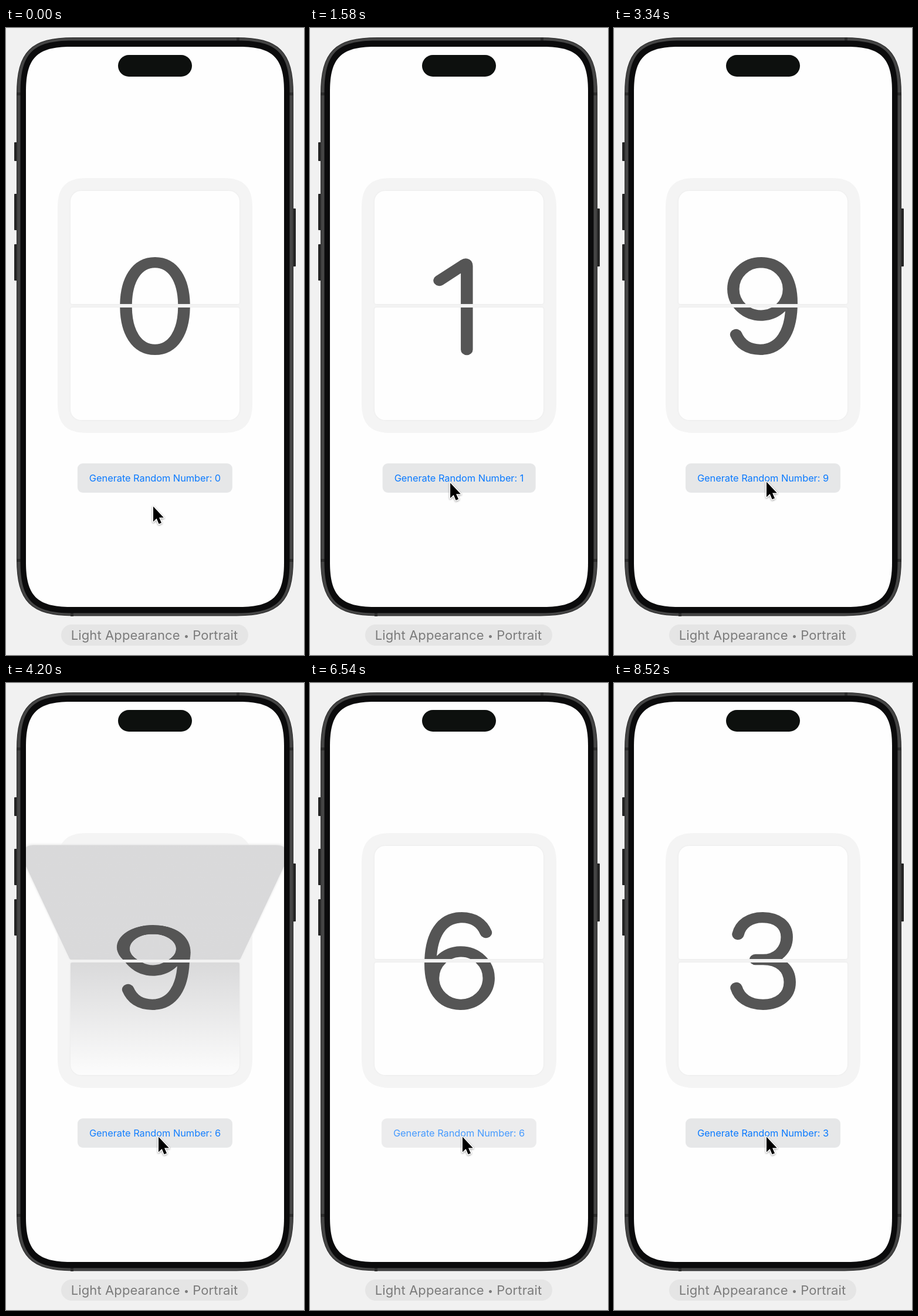
Write an HTML page that moves like this. It is 508 by 1070 pixels and loops after 8830 ms.

```html
<!DOCTYPE html>
<html lang="en">
<head>
<meta charset="utf-8">
<title>Flip counter</title>
<style>
  html, body { margin: 0; width: 100%; height: 100%; overflow: hidden; background: #f1f1f1; }
  #stage { position: relative; width: 508px; height: 1070px; overflow: hidden; font-family: Inter, sans-serif; }
  #phone, #screen { position: absolute; left: 0; top: 0; width: 508px; height: 1070px; }
  .half {
    position: absolute; left: 110px; width: 288px; overflow: hidden;
    background-color: #fefefe; box-shadow: 0 0 2px 1px #ededed;
  }
  .half svg { display: block; }
  .half path { fill: none; stroke: #555; stroke-width: 18.3; stroke-linecap: round; stroke-linejoin: round; }
  .top { top: 278px; height: 193px; border-radius: 18px 18px 3px 3px; transform-origin: 144px 196px; }
  .bottom { top: 477px; height: 192px; border-radius: 3px 3px 18px 18px; transform-origin: 144px -3px; }
  #button {
    position: absolute; left: 254px; top: 743px; height: 50px; padding: 0 20px;
    transform: translateX(-50%); border-radius: 9px; background: #e6e7e8; color: #0a7aff;
    font-size: 16.4px; letter-spacing: -.06px; line-height: 50px; white-space: nowrap;
  }
  #cursor {
    position: absolute; left: 0; top: 0; width: 30px; height: 40px; overflow: visible;
    filter: drop-shadow(0 1px 1.5px rgba(0, 0, 0, .4));
  }
</style>
</head>
<body>
<div id="stage">
  <svg id="phone" viewBox="0 0 508 1070">
    <g fill="#242424">
      <rect x="14" y="195" width="8" height="32" rx="1"/>
      <rect x="14" y="283" width="8" height="62" rx="1"/>
      <rect x="14" y="369" width="8" height="62" rx="1"/>
      <rect x="486" y="308" width="8" height="99" rx="1"/>
    </g>
    <path id="rim" fill="#454545" stroke="#353535" stroke-width="1.5"/>
    <g fill="#2d2d2d">
      <rect x="18" y="110" width="8" height="5"/>
      <rect x="482" y="110" width="8" height="5"/>
      <rect x="18" y="906" width="8" height="5"/>
      <rect x="482" y="906" width="8" height="5"/>
      <rect x="393" y="16" width="5" height="7"/>
      <rect x="110" y="997" width="5" height="7"/>
    </g>
    <path id="bezel" fill="#0b0b0c"/>
    <path id="glass" fill="#fefefe"/>
    <rect x="191" y="46" width="126" height="37" rx="18.5" fill="#0d100e"/>
    <path id="panel" fill="#f4f4f4"/>
    <rect x="94" y="1018" width="319" height="36" rx="18" fill="#e5e5e5"/>
    <text x="253" y="1044" font-size="22" letter-spacing=".1" fill="#7b7b7b" text-anchor="middle">Light Appearance <tspan font-size="16" dy="-1">•</tspan><tspan dy="1"> Portrait</tspan></text>
  </svg>
  <div id="screen">
    <div id="button">Generate Random Number: <span id="value">0</span></div>
  </div>
  <svg id="cursor" viewBox="0 0 30 40">
    <path d="M0 0V26L5.7 20.6L9.6 29.8L14 27.9L10 19H17.8Z"
      fill="#000" stroke="#fff" stroke-width="3" stroke-linejoin="round" paint-order="stroke"/>
  </svg>
</div>
<script>
const LOOP = 8830, FLIP = 600, FADE = 400, DEPTH = 395;
const $ = id => document.getElementById(id);
const clamp = v => Math.max(0, Math.min(1, v));

// Rounded box with smooth corners: a = corner reach, b = control distance.
function box(x, y, w, h, a, b) {
  const r = x + w, e = y + h;
  return `M${x + a} ${y}H${r - a}C${r - b} ${y} ${r} ${y + b} ${r} ${y + a}` +
    `V${e - a}C${r} ${e - b} ${r - b} ${e} ${r - a} ${e}` +
    `H${x + a}C${x + b} ${e} ${x} ${e - b} ${x} ${e - a}` +
    `V${y + a}C${x} ${y + b} ${x + b} ${y} ${x + a} ${y}Z`;
}
const glass = box(34, 32, 440, 956, 76, 19);
$('rim').setAttribute('d', box(18.7, 16.7, 470.6, 986, 96, 24));
$('bezel').setAttribute('d', box(24.5, 21.5, 459, 977, 88, 21.5));
$('glass').setAttribute('d', glass);
$('panel').setAttribute('d', box(88, 256, 332, 435, 50, 15));
$('screen').style.clipPath = `path("${glass}")`;

// Digits are centred on x = 0 and widened, so upright strokes come out heavier.
const nine = 'M-3 400.2A42.3 45.2 0 0 0 -3 490.6A42.3 45.2 0 0 0 -3 400.2' +
  'C28 400.2 43.5 428 43.5 469C43.5 520 26 548.8 -4 548.8C-23 548.8 -35 539 -41 523';
const glyphs = {
  0: 'M0 400.2C28 400.2 44.2 430 44.2 474.5S28 548.8 0 548.8S-44.2 519 -44.2 474.5S-28 400.2 0 400.2Z',
  1: 'M-29.9 431L8 403.5Q11.9 400.5 11.9 406V549',
  3: 'M-38 429C-34 411 -20 400.2 -1 400.2C22 400.2 36.3 413 36.3 433.5C36.3 456 21 472 0 472H-11.5' +
    'H0C26 472 40.8 488 40.8 511C40.8 533 25 548.8 0 548.8C-22 548.8 -36 537 -40.6 520',
  6: nine,
  9: nine
};

function makeHalf(side) {
  const el = document.createElement('div');
  const [y, h] = side === 'top' ? [278, 193] : [477, 192];
  el.className = 'half ' + side;
  el.innerHTML = `<svg width="288" height="${h}" viewBox="110 ${y} 288 ${h}"><path/></svg>`;
  $('screen').append(el);
  return el;
}
const [topCard, bottomCard, topFlap, bottomFlap] = ['top', 'bottom', 'top', 'bottom'].map(makeHalf);

function setDigit(el, n) {
  if (el.digit === n) return;
  el.digit = n;
  const path = el.querySelector('path');
  path.setAttribute('d', glyphs[n]);
  path.setAttribute('transform', `translate(254 0) scale(1.12 1) rotate(${n === 6 ? 180 : 0} 0 474.5)`);
}

const shade = alpha => `rgba(0, 0, 8, ${alpha})`;

function setFlap(el, on, angle, dark) {
  el.style.visibility = on ? 'visible' : 'hidden';
  el.style.transform = `perspective(${DEPTH}px) rotateX(${angle}deg)`;
  el.style.backgroundImage = `linear-gradient(${shade(dark)}, ${shade(dark)})`;
}

// cubic-bezier(.42, 0, .58, 1)
function easeInOut(x) {
  let lo = 0, hi = 1;
  for (let i = 0; i < 24; i++) {
    const p = (lo + hi) / 2, q = 1 - p;
    if (1.26 * p * q * q + 1.74 * p * p * q + p * p * p < x) lo = p; else hi = p;
  }
  return lo * lo * (3 - 2 * lo);
}

// Press time, release time, number after release
const taps = [
  [560, 758, 1], [2200, 2357, 9], [3780, 3977, 6],
  [5280, 5477, 6], [6540, 6757, 6], [7700, 7897, 3]
];

// Cursor moves: start, end, x, y
const moves = [[10, 180, 286, 781], [1340, 1700, 223, 774.5], [2950, 3200, 257, 774.5], [3270, 3340, 260, 774.5]];

function cursorAt(t) {
  let x = 251, y = 816.5;
  for (const [from, to, nx, ny] of moves) {
    const u = clamp((t - from) / (to - from)), k = u * u * (3 - 2 * u);
    x += (nx - x) * k;
    y += (ny - y) * k;
  }
  return [x, y];
}

function render(t) {
  let now = 0, next = 0, start = -FLIP, opacity = 1;
  for (const [down, up, n] of taps) {
    if (t >= down) opacity = t < up ? .75 : 1 - .25 * (1 - clamp((t - up) / FADE)) ** 2;
    if (t >= up) {
      now = next;
      next = n;
      start = up;
    }
  }
  const u = (t - start) / FLIP;
  const flipping = u < 1 && now !== next;
  const angle = flipping ? 180 * easeInOut(u) : 0;
  const dark = flipping ? .25 * (1 - Math.abs(angle - 90) / 90) : 0;

  setDigit(topCard, next);
  setDigit(bottomCard, flipping ? now : next);
  setDigit(topFlap, now);
  setDigit(bottomFlap, next);
  bottomCard.style.backgroundImage = `linear-gradient(${shade(dark)}, ${shade(dark * .05)})`;
  setFlap(topFlap, flipping && angle < 90, -angle, dark);
  setFlap(bottomFlap, flipping && angle >= 90, 180 - angle, dark);

  $('value').textContent = next;
  $('button').style.opacity = opacity;
  const [x, y] = cursorAt(t);
  $('cursor').style.transform = `translate(${x}px, ${y}px)`;
}

const begin = performance.now();
function frame() {
  render((performance.now() - begin) % LOOP);
  requestAnimationFrame(frame);
}
frame();
</script>
</body>
</html>
```
